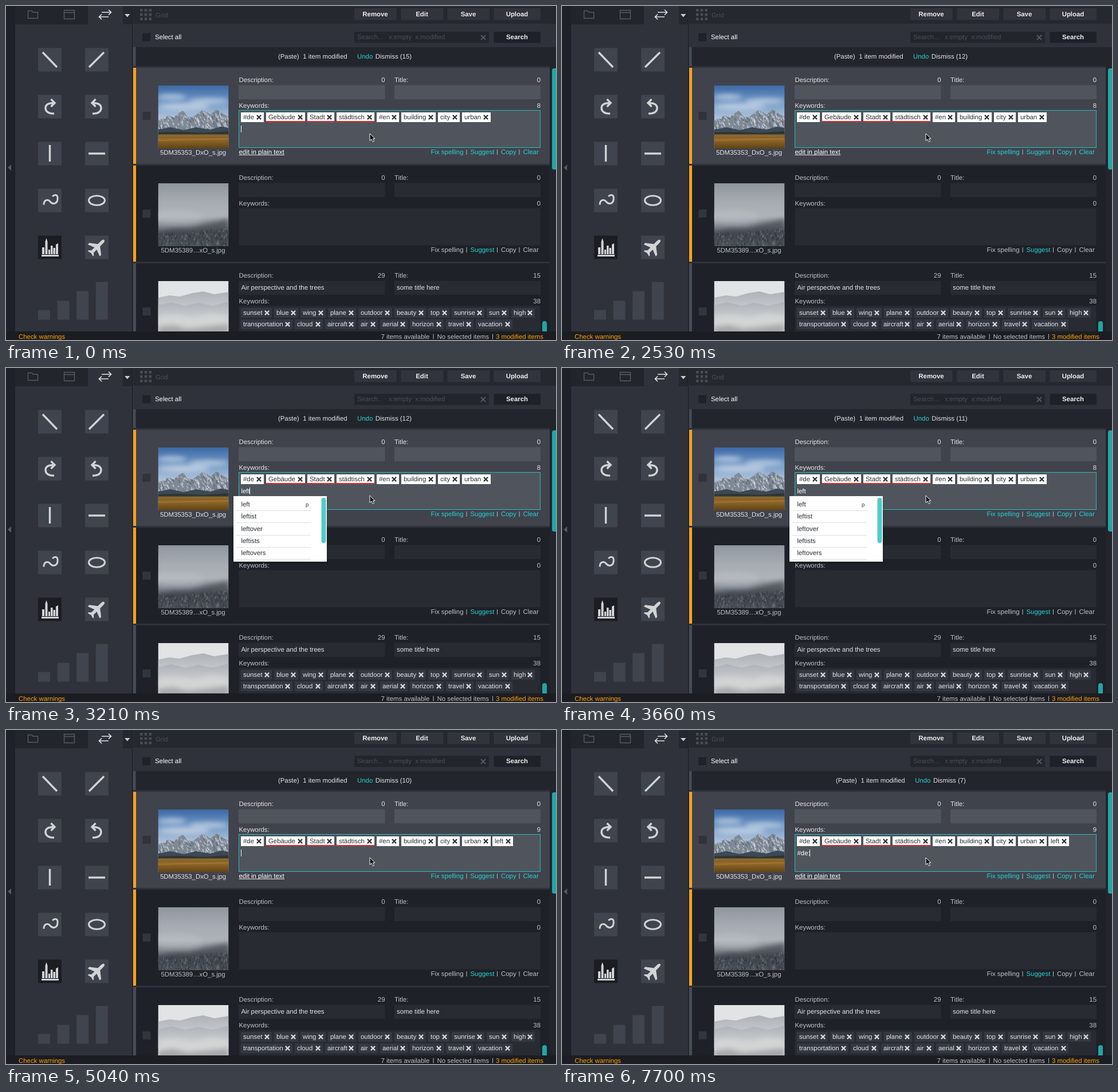
Animation, 960 px wide and 584 px high, one loop 8000 ms. Source, as an HTML page:

```html
<!DOCTYPE html>
<html lang="en">
<head>
<meta charset="utf-8">
<title>Keyword editor</title>
<style>
  html, body { margin: 0; width: 100%; height: 100%; overflow: hidden; background: #1e2127; }
  svg { display: block; }
  text { font: 11.4px "Liberation Sans", Arial, sans-serif; text-rendering: geometricPrecision; fill: #e2e3e6; white-space: pre; }
  text.bold { font-weight: 700; fill: #eceded; }
  .end { text-anchor: end; }
  .mid { text-anchor: middle; }
  text.teal, tspan.teal { fill: #23d3d3; }
  text.orange { fill: #ffa000; }
  text.faint { fill: #4b4f58; }
  text.grey { fill: #bdc0c5; }
  text.ink { fill: #2c2f35; }
  text.white { fill: #fff; }
  .icon { fill: none; stroke: #d2d3d5; stroke-width: 3.4; }
  .solid { fill: #d2d3d5; }
</style>
</head>
<body>
<svg id="stage" width="960" height="584" viewBox="0 0 960 584">
  <defs>
    <linearGradient id="sky" x2="0" y2="1">
      <stop stop-color="#3c69a6"/><stop offset=".25" stop-color="#6f96c5"/><stop offset=".5" stop-color="#a9c0d9"/>
    </linearGradient>
    <linearGradient id="field" x2="0" y2="1">
      <stop stop-color="#6e5430"/><stop offset=".35" stop-color="#946a28"/><stop offset="1" stop-color="#5f4219"/>
    </linearGradient>
    <linearGradient id="fog" x2="0" y2="1">
      <stop stop-color="#90969e"/><stop offset=".3" stop-color="#a6acb2"/><stop offset=".52" stop-color="#aeb3b8"/>
      <stop offset=".68" stop-color="#848a91"/><stop offset=".8" stop-color="#4b5158"/><stop offset="1" stop-color="#4d535a"/>
    </linearGradient>
    <linearGradient id="mist" x2="0" y2="1">
      <stop stop-color="#aeb2b8"/><stop offset="1" stop-color="#d2d4d6"/>
    </linearGradient>
    <filter id="blur" x="-30%" y="-50%" width="160%" height="200%"><feGaussianBlur stdDeviation="4"/></filter>
    <filter id="shadow" x="-10%" y="-40%" width="120%" height="220%"><feDropShadow dx="0" dy="2" stdDeviation="1.8" flood-opacity=".5"/></filter>
    <clipPath id="photo"><rect width="123" height="110"/></clipPath>
    <clipPath id="mountain"><path id="ridge" d="M0 61 11 57 18 52 27 56 35 49 43 44 50 52 59 56 68 50 77 43 84 46 92 51 101 42 108 45 114 50 123 54V88H0Z"/></clipPath>
    <clipPath id="body"><rect width="960" height="569"/></clipPath>
  </defs>
  <g id="scene"></g>

  <g clip-path="url(#body)">
    <g transform="translate(265.500 139)" clip-path="url(#photo)">
      <rect width="123" height="110" fill="url(#sky)"/>
      <g fill="#dfe6ee" filter="url(#blur)" opacity=".6">
        <ellipse cx="24" cy="20" rx="25" ry="5"/><ellipse cx="88" cy="27" rx="34" ry="5"/><ellipse cx="45" cy="37" rx="45" ry="6"/>
      </g>
      <use href="#ridge" fill="#7f8996"/>
      <g id="snow" clip-path="url(#mountain)"></g>
      <path d="M0 77 22 73 45 78 66 73 91 77 110 72 123 74V88H0Z" fill="#3b4856"/>
      <path d="M0 82 40 81 80 83 123 80V90H0Z" fill="#2e3430"/>
      <rect y="85" width="123" height="25" fill="url(#field)"/>
      <path d="M0 88H123M0 96 123 93" stroke="#b98a38" stroke-width="1.4" opacity=".5"/>
    </g>
    <g transform="translate(265.500 310)" clip-path="url(#photo)">
      <rect width="123" height="110" fill="url(#fog)"/>
      <path d="M0 88 25 80 55 79 85 70 123 62V100H0Z" fill="#3f454c" filter="url(#blur)" opacity=".7"/>
      <g id="trees"></g>
      <ellipse cx="32" cy="58" rx="48" ry="12" fill="#bcc0c4" filter="url(#blur)" opacity=".5"/>
    </g>
    <g transform="translate(265.500 481)" clip-path="url(#photo)">
      <rect width="123" height="110" fill="#e2e3e4"/>
      <path d="M0 29 20 25 38 27 60 21 79 18 98 23 123 19V62H0Z" fill="url(#mist)"/>
      <path d="M0 42 23 37 48 43 70 38 96 43 123 36V75H0Z" fill="url(#mist)"/>
      <path d="M0 62 30 59 64 65 91 57 123 61V92H0Z" fill="#d3d4d4" filter="url(#blur)"/>
      <path d="M0 80 26 77 51 83 80 80 123 75V110H0Z" fill="#a6a8a9" filter="url(#blur)"/>
    </g>
  </g>

  <g id="live">
    <text id="notice" class="mid" x="591.5" y="92">(Paste) <tspan dx="3.5">1 item modified</tspan><tspan class="teal" dx="17.5">Undo</tspan> <tspan dx="1.3">Dismiss (</tspan><tspan id="seconds">15</tspan>)</text>
    <text id="total" class="end" x="933" y="177.5">8</text>
    <g id="newChip"></g>
    <text id="typed" class="white" x="410.5" y="218.5"></text>
    <rect id="caret" y="209" width="1" height="12" fill="#f4f4f4"/>
    <g id="slimPopup">
      <rect x="397" y="224" width="163" height="8" fill="#fff" filter="url(#shadow)"/>
      <rect x="552" y="227" width="6" height="1.5" fill="#72cfd0"/>
    </g>
    <g id="popup"></g>
  </g>
  <path d="M635 223V235.500L638 232.800 640.200 237.500 642.500 236.500 640.400 232H644Z" fill="#111" stroke="#f5f5f5"/>
</svg>
<script>
const byId = id => document.getElementById(id);
const rect = (x, y, w, h, fill, extra = '') => `<rect x="${x}" y="${y}" width="${w}" height="${h}" fill="${fill}" ${extra}/>`;
const text = (x, y, str, cls = '') => `<text x="${x}" y="${y}" class="${cls}">${str}</text>`;
const path = (d, cls = 'icon', extra = '') => `<path d="${d}" class="${cls}" ${extra}/>`;
const cross = (x, y, r, color, width) =>
  `<path d="M${x - r} ${y - r}l${2 * r} ${2 * r}m0 ${-2 * r}l${-2 * r} ${2 * r}" stroke="${color}" stroke-width="${width}"/>`;

const DARK = '#1e2127', BAR = '#25282e', PANEL = '#2f323a', BOX = '#40444e', FIELD = '#282b32';

function chip(x, y, end, word, light, misspelt) {
  return rect(x, y, end - x, 17, light ? '#fff' : '#343841')
    + text(x + 4, y + 12, word, light ? 'ink' : '')
    + cross(end - 8.5, y + 8.5, 3.6, light ? '#34373d' : '#d6d8db', 2.2)
    + (misspelt ? rect(x, y + 15, end - x, 2, '#e02c2c') : '');
}

// Each chip ends four pixels before the next one starts.
function chips(y, words, starts, light) {
  return words.split(' ').map((word, i) =>
    chip(starts[i], y, starts[i + 1] - 4, word, light, light && /^(Geb|Sta|st)/.test(word))).join('');
}

function sidebar() {
  let out = rect(0, 0, 16, 569, DARK) + rect(16, 0, 205, 569, PANEL)
    + rect(16, 0, 127, 32, '#22252b') + rect(204, 0, 17, 32, '#24272d') + rect(220, 0, 1, 569, '#1a1c21')
    + path('M9 277V288L3 282.500Z', '', 'fill="#555961"')
    + path('M38.500 21.500V8.500H45L47 11H55.500V21.500Z M101.500 7.500H119.500V22.500H101.500Z M101.500 11.500H119.500', '', 'fill="none" stroke="#555a63" stroke-width="1.4"')
    + path('M167 11H183M179 6.500 183.500 11 179 15.500M179 19H163M167 14.500 162.500 19 167 23.500', '', 'fill="none" stroke="#e0e1e3" stroke-width="1.7"')
    + path('M207 14H216.500L211.700 19.500Z', '', 'fill="#c9cbce"');
  for (let i = 0; i < 10; i++)
    out += rect(56 + 82 * (i % 2), 73.5 + 82 * (i >> 1), 41, 41, i === 8 ? '#1b1d22' : BOX);
  const turn = path('M84 188C74 189 69 184 69 178.500C69 173 74 169.500 84 169.500M78.500 163 85 169.500 78.500 176');
  out += path('M64 81 89 107M145 107 171 81M76.500 243V272M144 258H173')
    + turn + `<g transform="matrix(-1 0 0 1 235 0)">${turn}</g>`
    + path('M66 347.500C66 339 73 337 77 342S89 347 90 338S85 329 81 333', 'icon', 'style="stroke-width:3"')
    + '<ellipse cx="158.500" cy="340" rx="14" ry="8.300" class="icon" style="stroke-width:3"/>'
    + path('M62 435H92V438H62ZM63 434V422H67V434ZM68.500 434V412L70.500 406 72.500 412V434ZM74 434V426H77V434ZM78 434V419H81.500V434ZM82.500 434V423H86V434ZM87 434V417L91 415V434Z', 'solid')
    + path('M0 -19C3 -19 3 -14 3 -10V-5L16 5V9L3 4V12L7 16V18L0 16-7 18V16L-3 12V4L-16 9V5L-3 -5V-10C-3 -14-3 -19 0 -19Z', 'solid', 'transform="translate(159 421.500) rotate(45) scale(.92)"');
  [17, 33, 50, 66].forEach((h, i) => out += rect(56 + 33.6 * i, 548.5 - h, 21, h, BOX));
  return out;
}

function toolbar() {
  let out = rect(222, 0, 738, 31, BAR) + rect(222, 31, 738, 41, PANEL);
  for (let i = 0; i < 9; i++) out += rect(234 + 7.7 * (i % 3), 5 + 7.7 * (i / 3 | 0), 4.6, 4.6, '#484c55');
  out += text(261, 20, 'Grid', 'faint');
  [['Remove', 608], ['Edit', 689.5], ['Save', 770.5], ['Upload', 851.5]].forEach(([label, x]) =>
    out += rect(x, 4, 73.5 + (x > 800 ? 8 : 0), 20.5, '#31343c') + text(x + (x > 800 ? 40.5 : 36.5), 18, label, 'bold mid'));
  out += rect(238, 47.5, 14, 14, '#1f2228') + text(260, 58, 'Select all', 'white')
    + rect(608, 45, 235, 19.5, '#22252b') + text(613, 58, 'Search...', 'faint')
    + text(668, 58, 'x:empty', 'faint') + text(714.5, 58, 'x:modified', 'faint') + cross(833, 55, 4, '#555962', 2)
    + rect(851.5, 45, 81.5, 19.5, DARK) + text(892, 58, 'Search', 'bold mid');
  return out;
}

function item(y, { active, edge, desc = '', title = '', name, counts }) {
  const field = active ? '#50555d' : FIELD;
  const label = active ? '' : 'grey';
  let out = rect(222, y, 727, 168, active ? '#40434c' : DARK) + rect(222, y, 5, 168, edge)
    + rect(238.5, y + 77, 14, 14, active ? '#30333a' : '#31353d')
    + text(406.5, y + 25, 'Description:', label) + text(661.5, y + 25, counts[0], label + ' end')
    + text(678, y + 25, 'Title:', label) + text(933, y + 25, counts[1], label + ' end')
    + rect(406, y + 30.5, 255.5, 24.5, field) + rect(678, y + 30.5, 255, 24.5, field)
    + text(410.5, y + 46, desc) + text(682, y + 46, title)
    + text(406.5, y + 69.5, 'Keywords:', label)
    + rect(406.5, y + 74.5, 526, 65, field, active ? 'stroke="#25bcbc"' : '');
  if (!active) out += text(933, y + 69.5, counts[2], 'grey end');
  if (name) {
    out += text(326.5, y + 152, name, label + ' mid');
    [['Fix spelling', 741.5], ['Suggest', 810.5], ['Copy', 864], ['Clear', 902.5]].forEach(([link, x], i) => {
      out += text(x, y + 151, link, active || i === 1 ? 'teal' : 'grey');
      if (i) out += rect(x - 7, y + 143, 1, 9, '#b4b7bc');
    });
  }
  return out;
}

function popupList() {
  let out = rect(397, 224, 163, 114.5, '#fff', 'filter="url(#shadow)"') + rect(550.5, 227, 8, 79, '#50cbc9', 'rx="4"');
  'left leftist leftover leftists leftovers'.split(' ').forEach((word, i) => {
    const y = 242 + 21.3 * i;
    out += text(410.5, y, word, 'ink') + rect(402, Math.round(y + 7), 130, 1, '#dedede');
  });
  return out + `<text x="523" y="241.500" class="ink" style="font-size:9.500px">p</text>`;
}

// Scatters small wedges below the line that runs from `top` down by `slope` per pixel.
function wedges(count, top, slope, depth, lean, shades) {
  let seed = 7, out = '';
  const random = () => (seed = seed * 16807 % 2147483647) / 2147483647;
  for (let i = 0; i < count; i++) {
    const x = random() * 123, y = top + x * slope + random() * depth, h = 3 + random() * 6;
    const shade = shades[random() * shades.length | 0];
    out += `<path d="M${x.toFixed(1)} ${y.toFixed(1)}l${lean - 1.3} ${h.toFixed(1)}h2.600z" fill="${shade}" opacity=".55"/>`;
  }
  return out;
}

byId('scene').innerHTML = rect(0, 0, 960, 584, PANEL) + sidebar() + toolbar()
  + rect(222, 72, 738, 33, '#22252b') + rect(222, 72, 4.5, 33, '#454c53')
  + rect(949, 105, 11, 464, '#22252b')
  + item(108, { active: true, edge: '#f9a21b', name: '5DM35353_DxO_s.jpg', counts: [0, 0] })
  + text(406.5, 259, 'edit in plain text', 'white') + rect(406.5, 260, 79.5, 1, '#e2e3e6')
  + item(279, { edge: '#f9a21b', name: '5DM35389…xO_s.jpg', counts: [0, 0, 0] })
  + item(450, { edge: '#454c53', desc: 'Air perspective and the trees', title: 'some title here', counts: [29, 15, 38] })
  + chips(186, '#de Gebäude Stadt städtisch #en building city urban', [410, 454, 526, 577, 647, 690, 754, 796, 850], true)
  + chips(528, 'sunset blue wing plane outdoor beauty top sunrise sun high', [410, 468, 514, 562, 615, 678, 737, 778, 839, 882, 927])
  + chips(548, 'transportation cloud aircraft air aerial horizon travel vacation', [410, 504, 557, 615, 653, 705, 768, 820, 888])
  + rect(953, 109, 10, 177, '#20a6a8', 'rx="3.500"') + rect(936, 551, 8, 22, '#20a6a8', 'rx="4"')
  + rect(0, 569, 960, 15, '#1b1d22')
  + text(22, 582, 'Check warnings', 'orange') + text(654.5, 582, '7 items available', 'grey')
  + rect(745.5, 573.5, 1, 9, '#b4b7bc') + text(752.5, 582, 'No selected items', 'grey')
  + rect(849, 573.5, 1, 9, '#b4b7bc') + text(855, 582, '3 modified items', 'orange');
byId('snow').innerHTML = wedges(230, 40, 0, 34, 2.5, ['#eef1f4', '#dfe4ea', '#505c6b']);
byId('trees').innerHTML = wedges(240, 86, -.09, 34, 0, ['#7b8289', '#2c3238', '#353b42']);
byId('newChip').innerHTML = chip(849, 186, 885, 'left', true);
byId('popup').innerHTML = popupList();

const LOOP = 8000;
const COUNTDOWN = [350, 1330, 2350, 3390, 4320, 5400, 6320, 7340];
const CARET_FLIPS = [530, 890, 1450, 1990, 2530, 2710, 3660, 4110, 4590, 5040, 5490, 5970];
const TYPING = [[0, ''], [2710, 'l'], [2790, 'le'], [2970, 'lef'], [3210, 'left'], [3840, ''],
  [6620, '#'], [6980, '#d'], [7250, '#de'], [7700, '#de:']];

const passed = (times, t) => times.filter(at => at <= t).length;
const show = (id, on) => byId(id).style.display = on ? '' : 'none';
const setText = (id, value) => {
  const node = byId(id);
  if (node.textContent !== String(value)) node.textContent = value;
};

function draw(now) {
  const t = now % LOOP;
  const added = t >= 3840;
  setText('seconds', 15 - passed(COUNTDOWN, t));
  setText('total', added ? 9 : 8);
  setText('typed', TYPING[passed(TYPING.map(step => step[0]), t) - 1][1]);
  show('newChip', added);
  show('slimPopup', t >= 3090 && t < 3210);
  show('popup', t >= 3210 && !added);
  show('caret', passed(CARET_FLIPS, t) % 2 === 0);
  byId('caret').setAttribute('x', Math.round(410 + byId('typed').getComputedTextLength()));
  requestAnimationFrame(draw);
}
draw(performance.now());
</script>
</body>
</html>
```
